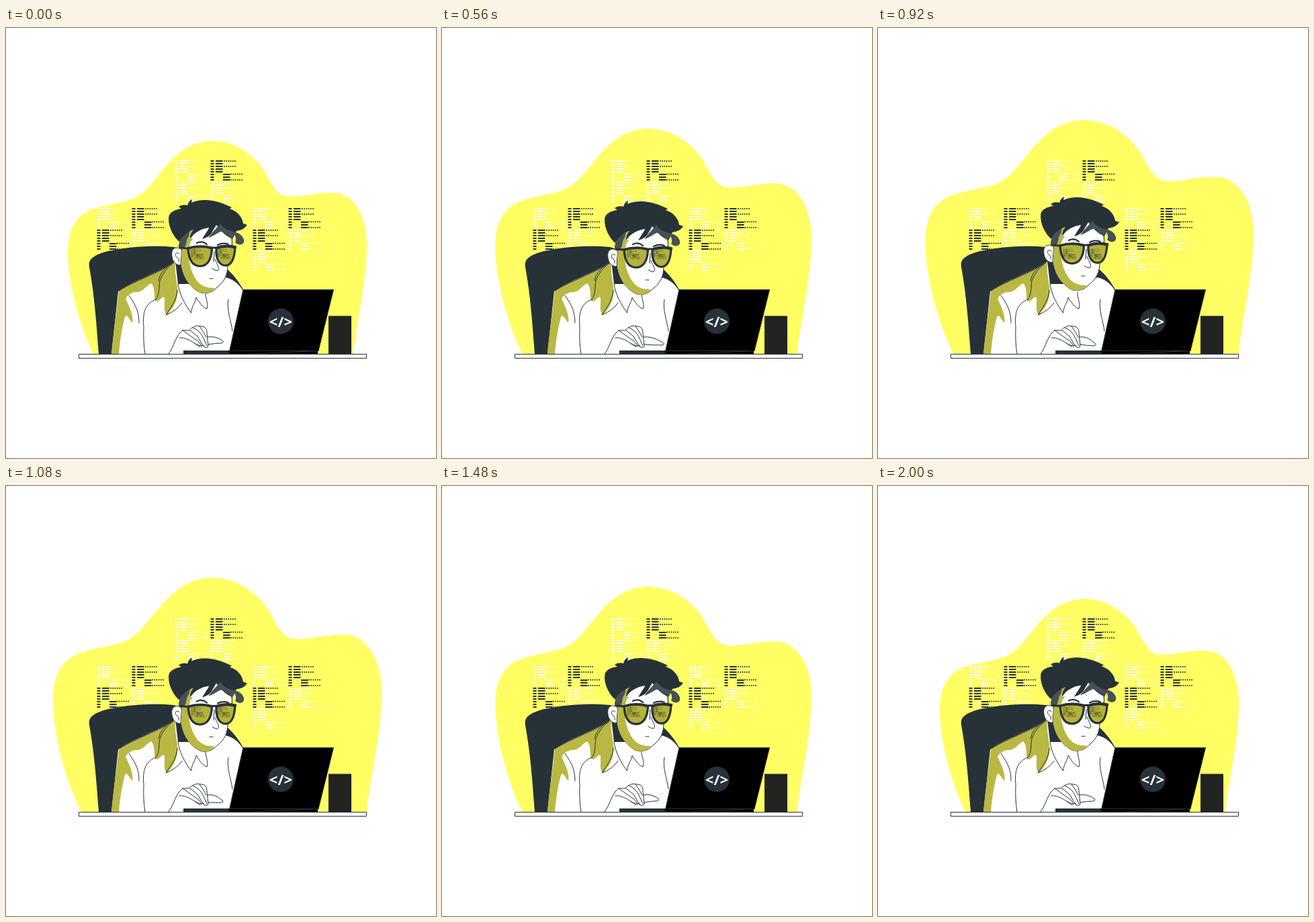
These frames come from a looping animation (640x640 px, 2040 ms). An HTML page:

```html
<!DOCTYPE html>
<html lang="en">
<head>
<meta charset="utf-8">
<style>
  html, body { margin: 0; width: 100%; height: 100%; overflow: hidden; background: #fff; }
  svg { display: block; width: 100vw; height: 100vh; }
  .ink { fill: #263238; }
  .shade { fill: #b9b842; }
  .grey { fill: #455057; }
  .line { fill: none; stroke: #263238; stroke-width: 1; stroke-linecap: round; stroke-linejoin: round; }
  .skin { fill: #fff; stroke: #263238; stroke-width: 1; }
</style>
</head>
<body>
<svg viewBox="0 0 640 640">
  <defs>
    <g id="code" fill="none" stroke="currentColor" stroke-width="2">
      <path id="dashes"/>
      <path d="M21 1h17M21 9h17M31 20.500h17M31 29h17" stroke-linecap="round" stroke-dasharray="0 3.200"/>
    </g>
    <path id="lensL" d="M271 328C272 345 277 354.500 289 354.500C300 354.500 306 344 306.500 328Q289 323 271 328Z"/>
    <path id="lensR" d="M313 328C312 343 317 353.500 327 353.500C336 353 340 342 341 327Q327 323 313 328Z"/>
    <clipPath id="lenses">
      <g></g>
      <use class="nod" href="#lensL"/>
      <use class="nod" href="#lensR"/>
    </clipPath>
  </defs>

  <path id="blob" fill="#ffff64" d="M130 485C113 450 93 390 92 335C92 296 106 275 137 267C165 260 185 259 201 247C221 232 235 203 262 183C276 173 292 168 308 168C340 169 364 186 379 205C391 220 397 245 414 250C433 254 455 245 486 245C516 245 537 278 537 322C537 380 521 440 517 485Z"/>
  <g id="wall"></g>

  <!-- chair -->
  <path class="ink" d="M138 485C134 430 131 395 124 356C122 344 130 338 152 332C185 325 220 323 250 326L310 345C332 358 345 374 354 391L300 420L168 485Z"/>

  <!-- shirt -->
  <path fill="#fff" d="M157 485L167 392C190 375 230 364 252 347L256 381L282 381L328 371C340 374 349 383 353 391L331 485Z"/>
  <path class="shade" d="M157 485C160 450 165 420 168 391C195 374 232 364 252 347C250 365 257 385 255 397C253 412 246 419 240 427C233 422 237 410 236 402C233 396 228 410 222 406C220 398 222 385 216 380C208 384 204 393 195 393C188 392 180 398 178 403C184 416 190 428 188 439C182 432 180 425 177 430C172 448 169 470 168 485Z"/>
  <path class="ink" d="M257 345L256 381H284L300 350Z"/>
  <path class="line" d="M168 391C195 374 232 364 252 347M183 398C190 409 198 418 198 439M204 485M223 404C229 396 227 388 229 376Q235 360 249 350M227 376Q230 362 242 354M223 404C207 410 203 424 205 445Q204 468 207 485M256 381C258 396 266 411 275.500 424C277 412 282 409 283 401C288 409 293 416 299 418C302 409 296 402 297 393M255 390C254 406 245 416 238 427Q254 421 262 409M328 371C340 374 349 383 353 391M331 404C328 420 335 435 337 451"/>

  <!-- laptop, cup, table -->
  <path class="ink" d="M264 480H335V487H264Z"/>
  <path d="M331 480H464V487H331Z"/>
  <path d="M353 389.500H487.500L465 480.500L331.500 486.500Z" stroke="#263238"/>
  <path class="line" d="M353 390L331.500 486.500M334 480.500H465"/>
  <circle class="ink" cx="409" cy="436.500" r="19"/>
  <text x="409" y="444.500" fill="#fff" font-family="'Noto Sans', 'Open Sans', sans-serif" font-size="22" font-weight="700" text-anchor="middle">&lt;/&gt;</text>
  <path fill="#222422" d="M480 428.500H514V485.500H480Z"/>
  <path class="skin" d="M108.500 485.500H536.500V491.500H108.500Z"/>

  <!-- hand -->
  <path class="line" d="M242 485C250 475 252 458 263 450L273 450C276 445 284 442 290 444C298 444 299 449 299 454L301 473Q299 478 294 474L285 459L274 450M263 450L281 463Q290 468 291 474M258 461C267 460 277 466 289 475M278 446Q289 450 294 462L299 473M288 444Q294 452 298 460M281 470Q288 474 295 473"/>
  <path id="finger" class="line"/>

  <!-- head -->
  <g class="nod">
    <path class="skin" d="M263 331C253 323 245 328 247 340C248 350 256 355 263 352Z"/>
    <path class="line" d="M258 336C252 332 250 338 255 342Q258 344 257 348"/>
    <path class="skin" d="M262 325L272 300L320 290L336 308C338 325 335 340 330 353C330 366 326 377 314 386C305 396 292 397 284 391C270 381 262 368 260 350Z"/>
    <path class="shade" d="M262 325L270 302L292 298C280 308 274 316 273 325C270 342 274 362 284 376C290 384 298 387 311 387C304 396 292 397 284 391C270 381 262 368 261 350Z"/>
    <path class="grey" d="M257 328C256 316 264 304 274 300L272 310C267 315 270 324 264 328Z"/>
    <path class="ink" d="M258 318C248 310 240 292 242.500 280C244 274 252 270 261 269L257 266Q262 262 270 264Q272 257 277 255L276 260C292 253 312 255 336 267L333 269C345 273 352 282 353 291L359 293C355 299 350 301 343 302L337 314C328 310 320 303 313 293L306 305C304 308 300 312 292 314L302 298C292 302 285 306 276 316C272 312 276 304 279 300C270 303 262 309 258 318Z"/>
    <path class="grey" d="M319 291C314 297 309 302 301 312C312 309 317 302 322 303C329 307 333 312 337 314L342 304C334 303 324 299 319 291Z"/>
    <path class="grey" d="M338 304C347 303 356 312 354 319C351 324 345 323 341 319C344 314 341 309 338 304Z"/>
    <path fill="#fff" d="M274 315C279 304 291 299 302 297C299 307 288 312 274 315Z"/>
    <path class="line" stroke-width="2" style="stroke-width:2.200" d="M284 320Q292 316 299 322M315 323Q323 319 331 322"/>
    <path class="line" d="M310 333L309 348M311 344C314 352 319 358 315 361Q311 361 307 358M303 373H308M336 312Q337 320 336 326"/>
    <g fill="#b4b238" stroke="#263238" stroke-width="3.200" stroke-linejoin="round">
      <use href="#lensL"/><use href="#lensR"/>
      <path fill="none" d="M259 327L270 328Q288 322 306 327H313Q326 322 343 326"/>
    </g>
  </g>
  <g id="glints" clip-path="url(#lenses)"></g>
</svg>
<script>
const $ = id => document.getElementById(id);
const LOOP = 2040, STEP = 40;

// One code snippet: left column, middle column, indented column.
const rows = [1, 5, 9, 13, 17, 21, 25, 29];
$("dashes").setAttribute("d", rows.map((y, i) =>
  `M0.500 ${y}h5` + (i < 5 ? `M8 ${y}h10.500` : `M19 ${y}h10.500`)).join(""));

const snippet = (x, y, color, scale = 1) =>
  `<use href="#code" color="${color}" transform="translate(${x} ${y}) scale(${scale})"/>`;
const dark = [[304, 197], [187, 268], [135, 300], [420, 268], [367, 300]];
const light = [[251, 197], [251, 229], [304, 229], [135, 268], [187, 300],
               [367, 268], [420, 300], [367, 331]];
$("wall").innerHTML =
  light.map(p => snippet(...p, "#fffff0")).join("") +
  dark.map(p => snippet(...p, "#263238")).join("");
$("glints").innerHTML = [275.5, 314.5].map(x =>
  snippet(x, 329, "#4a4f35", 0.38) + snippet(x + 0.5, 336, "#5d6035", 0.25) +
  snippet(x + 9, 337, "#34402f", 0.22)).join("");

// Smooth periodic curve through evenly described key poses.
const times = [0, 240, 560, 920, 1280, 1640];
function curve(values, t) {
  const n = times.length;
  const at = i => {
    const k = (i + n) % n;
    return [times[k] + Math.floor(i / n) * LOOP, values[k]];
  };
  const slope = i => {
    const [a, u] = at(i - 1), [b, v] = at(i + 1);
    return (v - u) / (b - a);
  };
  let i = n - 1;
  while (times[i] > t) i--;
  const [a, u] = at(i), [b, v] = at(i + 1);
  const d = b - a, s = (t - a) / d, r = 1 - s;
  return u * r * r * (1 + 2 * s) + v * s * s * (3 - 2 * s) +
         d * s * r * (slope(i) * r - slope(i + 1) * s);
}

const nods = document.querySelectorAll(".nod");
const start = performance.now();

function draw(now) {
  const t = Math.floor(Math.max(0, now - start) % LOOP / STEP) * STEP;

  const zoom = 1 + 0.05 * (1 - Math.cos(2 * Math.PI * t / LOOP));
  $("blob").setAttribute("transform",
    `translate(314.500 485) scale(${zoom}) translate(-314.500 -485)`);

  const y = curve([0, 3.5, 2, -4, 6, -5], t);
  nods.forEach(el => el.setAttribute("transform", `translate(0 ${y})`));

  const tipX = 324 + curve([0, 4, 7, 1, -1, 0], t);
  const tipY = 467 + curve([0, 0, 3, 4, 0, 0], t);
  $("finger").setAttribute("d",
    `M300 460Q311 458 ${tipX - 4} ${tipY - 3}Q${tipX + 2} ${tipY} ${tipX - 3} ${tipY + 2}Q312 ${tipY + 2} 301 471`);

  requestAnimationFrame(draw);
}
draw(start);
</script>
</body>
</html>
```
